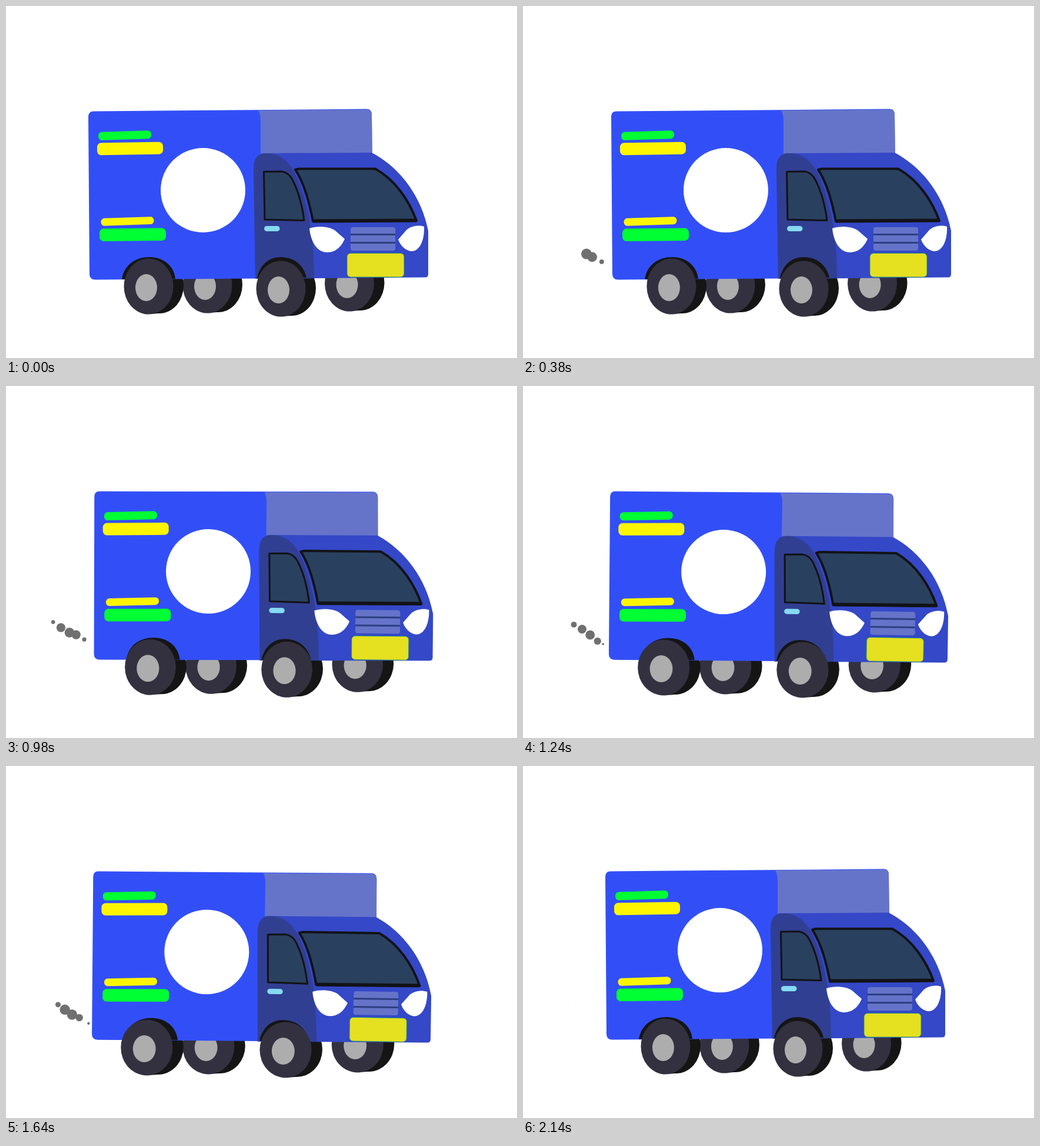
Recreate the animation shown at these times as an HTML page. Size 869 by 600 pixels, loop 2160 ms.

```html
<!DOCTYPE html>
<html>
<head>
<meta charset="utf-8">
<title>Delivery truck</title>
<style>
html, body { margin: 0; width: 100%; height: 100%; overflow: hidden; background: #fff; }
svg { display: block; width: 869px; height: 600px; }
</style>
</head>
<body>
<svg viewBox="0 0 869 600">
  <g id="smoke" fill="#707070"></g>
  <g id="back"></g>
  <g id="body">
    <path fill="#324ff7" d="M140 189Q140 179.500 149 179.500L613 175.500Q622 175.500 622 185L623 300L430 464.500L152 466.500Q142 466.500 142 457Z"/>
    <path fill="#6574c9" d="M429 178Q433 184 433 196V256H623L622 186Q622 176.500 613 176.500Z"/>
    <path fill="#3448c8" d="M421 278Q421 251 440 251L622 250C668 274 706 322 718 383V457Q718 462.500 713 462.500L424 465Z"/>
    <path fill="#313f92" d="M421 278Q421 252 440 251C473 250 489 274 501 308C513 342 524 390 524 464L424 465Z"/>
    <g fill="#29415f" stroke="#121216" stroke-width="4" stroke-linejoin="round">
      <path stroke-width="3" d="M438.500 282.500L469 282Q481 284 487 296Q502 325 507 365.500L440 364Z"/>
      <path d="M492 279L498 277.500L628 277.500C663 297 686 333 698 366L522 367C515 330 506 300 492 279Z"/>
    </g>
    <path stroke="#121216" stroke-width="6" d="M522 366.500L698 365.500"/>
    <rect x="439" y="375" width="26.500" height="9" rx="4.500" fill="#85daf2"/>
    <g fill="#fff">
      <path d="M516 379C530 374 552 376 560 383L576 397C570 411 560 420 546 420C528 420 518 400 516 379Z"/>
      <path d="M711 376C698 372 685 377 680 383L667 398C672 412 683 418 690 418C703 418 712 400 711 376Z"/>
      <circle cx="335" cy="314" r="72"/>
    </g>
    <rect x="586" y="377" width="76" height="40" rx="4" fill="#6574c9"/>
    <path stroke="#2c3f80" stroke-width="3" d="M586 389.500H662M586 403.500H662"/>
    <rect x="580" y="421.500" width="97" height="40.500" rx="6" fill="#e5e020" stroke="#18946c" stroke-width=".8"/>
    <g fill="#00ff33">
      <rect x="157" y="213.500" width="90" height="14" rx="6" transform="rotate(-2 202 220)"/>
      <rect x="159" y="379" width="113" height="21.500" rx="7" transform="rotate(-.7 215 390)"/>
    </g>
    <g fill="#fff500">
      <rect x="155" y="232.500" width="112" height="21" rx="7" transform="rotate(-1 211 243)"/>
      <rect x="161.500" y="360.500" width="90" height="13" rx="6" transform="rotate(-2 206 367)"/>
    </g>
    <path fill="#151515" d="M197 466C201 440 222 428 243 428C269 428 286 444 288 465ZM427 464C432 440 448 428 467 428C492 428 507 444 511 463Z"/>
  </g>
  <g id="front"></g>
</svg>
<script>
const LOOP = 2160, SWAY = 720;
const PUFFS = 16, PUFF_GAP = 100, PUFF_LIFE = 545;
const [smoke, back, body, front] = ['smoke', 'back', 'body', 'front'].map(id => document.getElementById(id));

function add(parent, tag, attrs) {
  const el = document.createElementNS('http://www.w3.org/2000/svg', tag);
  set(el, attrs);
  return parent.appendChild(el);
}

function set(el, attrs) {
  for (const k in attrs) el.setAttribute(k, attrs[k]);
}

const ellipse = (parent, cx, cy, rx, ry, fill) => add(parent, 'ellipse', { cx, cy, rx, ry, fill });

// The tread always stays behind the body; the face only on the far side
function wheel(x, y, layer) {
  for (const depth of [9, 18]) ellipse(back, x + 4 + depth, y - 2 - depth / 20, 41.5, 47, '#151515');
  ellipse(layer, x + 4, y - 2, 42, 47.5, '#33313f');
  ellipse(layer, x, y, 18.5, 23, '#adadad');
}
wheel(338.5, 478, back);
wheel(580, 475, back);
wheel(238.5, 480, front);
wheel(463.5, 484, front);

// Repeatable noise from -1 to 1
function noise(n) {
  const v = Math.sin(n * 12.9898) * 43758.5453;
  return 2 * (v - Math.floor(v)) - 1;
}

const lerp = (a, b, u) => a + (b - a) * u;
const ease = u => u < 0.5 ? 4 * u ** 3 : 1 - 4 * (1 - u) ** 3;
// Eased swing 0 -> 1 -> 0 over one period
const swing = (t, period) => ease(1 - Math.abs(1 - 2 * (t % period) / period));

const dots = Array.from({ length: PUFFS }, () => add(smoke, 'circle', {}));

function drawPuff(dot, i, t) {
  const u = (t - PUFF_GAP * (i + 1)) / PUFF_LIFE;
  const size = 8.8 + noise(i + 40);
  set(dot, {
    cx: lerp(143 + 3 * noise(i + 1), 76 + 5 * noise(i + 60), u),
    cy: lerp(441 + 5 * noise(i + 20), 401 + 4 * noise(i + 80), u),
    r: u > 0 && u < 1 ? size * Math.sin(Math.PI * u) : 0
  });
}

function draw(t) {
  const x = 10 * swing(t, SWAY), tip = swing(t, SWAY / 2);
  set(body, { transform: `translate(${x}) rotate(${0.9 * tip} 142 300)` });
  // Wheels spread sideways as the body tips forward
  const spread = `translate(${x + 437} ${2 * tip}) scale(${1 + 0.05 * tip} 1) translate(-437)`;
  for (const layer of [back, front]) set(layer, { transform: spread });
  dots.forEach((dot, i) => drawPuff(dot, i, t));
}

const start = performance.now();
function tick() {
  draw((performance.now() - start) % LOOP);
  requestAnimationFrame(tick);
}
tick();
</script>
</body>
</html>
```
